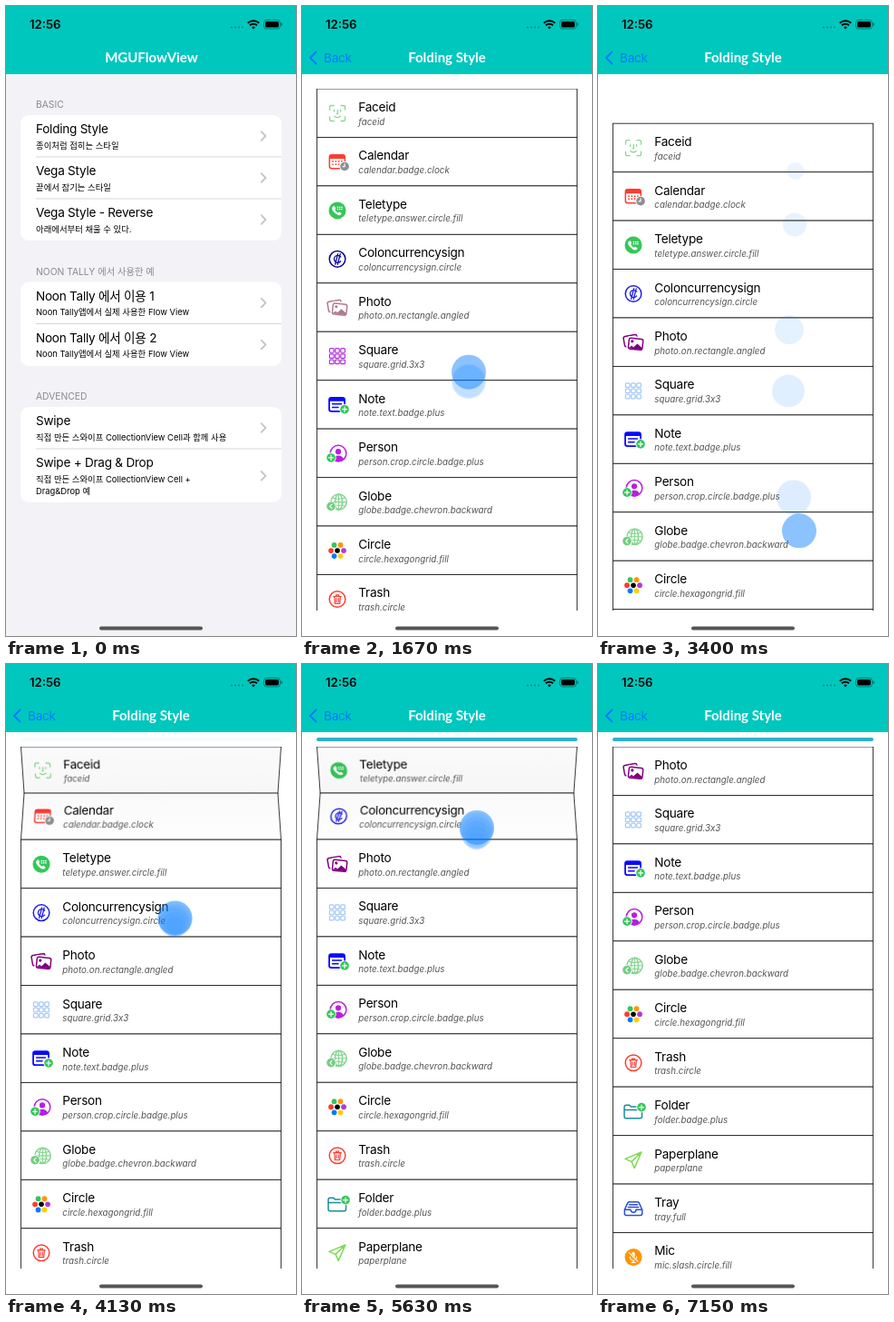
Recreate the animation shown at these times as an HTML page. Size 320 px wide and 693 px high, loop 7190 ms.

```html
<!DOCTYPE html>
<html lang="ko">
<head>
<meta charset="utf-8">
<title>Folding list</title>
<style>
html, body { margin: 0; width: 100%; height: 100%; overflow: hidden; background: #fff; }
#stage { position: relative; width: 320px; height: 693px; overflow: hidden; background: #f2f2f7; }
#stage > svg, #page { position: absolute; left: 0; top: 0; width: 320px; height: 693px; }
svg { display: block; overflow: visible; }
text { font-family: Inter, "Noto Sans CJK KR", "Noto Sans CJK", sans-serif; }
.title { font-size: 13.6px; letter-spacing: -.26px; }
.sub { font-size: 9.4px; }
.head { font-size: 10.3px; fill: #8a8a8e; }
.nav { font: 700 15px Lato, sans-serif; fill: #fff; text-anchor: middle; }
.name { font-size: 9.8px; font-style: italic; fill: #555; }
#page { background: #fff; }
#bar { position: absolute; left: 16px; top: 81px; width: 288px; height: 4px; border-radius: 2px; background: #30b0c7; }
#list { position: absolute; left: 15px; top: 90.5px; width: 290px; height: 574.5px; overflow: hidden; }
.row { position: absolute; left: 1px; top: .5px; width: 288px; height: 53.45px; background: #fff; }
.row svg, .shade { position: absolute; left: 0; top: 0; width: 288px; height: 53.45px; }
</style>
</head>
<body>
<div id="stage">
  <svg id="menu" viewBox="0 0 320 693"></svg>
  <div id="page"><div id="bar"></div><div id="list"></div></div>
  <svg viewBox="0 0 320 693">
    <rect width="320" height="75" fill="#00c7be"/>
    <text x="26" y="25.3" font-size="13.2" font-weight="600">12:56</text>
    <path d="M249 23.5h13" stroke="#000" stroke-opacity=".3" stroke-width="2" stroke-linecap="round" stroke-dasharray="0 4"/>
    <g fill="none" stroke="#000" stroke-width="1.9">
      <path d="M266.8 18.7a9 9 0 0 1 12.4 0M269 21.3a5.8 5.8 0 0 1 8 0"/>
      <path d="M273 25.4l-1.9-2a2.8 2.8 0 0 1 3.8 0z" fill="#000" stroke="none"/>
      <rect x="284.5" y="15.4" width="18" height="9.6" rx="3" stroke-width=".9" stroke-opacity=".45"/>
      <rect x="286" y="16.9" width="15" height="6.6" rx="1.8" fill="#000" stroke="none"/>
      <path d="M304.2 18.8v3" stroke-width="1.1" stroke-opacity=".5"/>
    </g>
    <text id="menuTitle" class="nav" x="160.5" y="62">MGUFlowView</text>
    <text id="pageTitle" class="nav" x="160" y="62">Folding Style</text>
    <g id="back">
      <path d="M15.5 50.5L9 57l6.5 6.5" fill="none" stroke="#007aff" stroke-width="2" stroke-linecap="round" stroke-linejoin="round"/>
      <text class="title" x="24" y="62" fill="#007aff">Back</text>
    </g>
    <rect x="103" y="682.5" width="114" height="4" rx="2" fill="#555"/>
    <g id="touches" fill="#007aff"></g>
  </svg>
</div>
<script>
const LOOP = 7190, ROW = 53.45, PAIR = ROW * 2, DEPTH = 420, RECOLOR = 3200;
const $ = id => document.getElementById(id);
const clamp = (v, a = 0, b = 1) => Math.min(b, Math.max(a, v));

// Menu screen
const card = (top, bottom, lines) =>
  `<rect x="16" y="${top}" width="288" height="${bottom - top}" rx="9" fill="#fff"/>` +
  lines.map(y => `<path d="M33 ${y}H304" stroke="#c6c6c8" stroke-width=".7"/>`).join('');
const label = (cls, y, s) => `<text class="${cls}" x="33" y="${y}">${s}</text>`;
const item = (y, title, ...subs) => label('title', y, title) +
  subs.map((s, i) => label('sub', y + 16.8 + i * 13, s)).join('') +
  `<path d="M281.7 ${y + 3 + (subs.length - 1) * 6.5 - 4.8}l4.8 4.8-4.8 4.8" fill="none" stroke="#c4c4c6" stroke-width="1.8" stroke-linecap="round" stroke-linejoin="round"/>`;

$('menu').innerHTML = '<rect width="320" height="693" fill="#f2f2f7"/>' +
  label('head', 112, 'BASIC') + card(120, 258, []) +
  '<path id="pressed" d="M16 166V129a9 9 0 0 1 9-9H295a9 9 0 0 1 9 9V166z" fill="#d1d1d6"/>' +
  '<path d="M33 166H304M33 212H304" stroke="#c6c6c8" stroke-width=".7"/>' +
  item(140, 'Folding Style', '종이처럼 접히는 스타일') +
  item(186, 'Vega Style', '끝에서 잠기는 스타일') +
  item(232, 'Vega Style - Reverse', '아래에서부터 채울 수 있다.') +
  label('head', 295.5, 'NOON TALLY 에서 사용한 예') + card(303.5, 396, [349.5]) +
  item(323.5, 'Noon Tally 에서 이용 1', 'Noon Tally앱에서 실제 사용한 Flow View') +
  item(369.5, 'Noon Tally 에서 이용 2', 'Noon Tally앱에서 실제 사용한 Flow View') +
  label('head', 433, 'ADVENCED') + card(441, 546, [487]) +
  item(461, 'Swipe', '직접 만든 스와이프 CollectionView Cell과 함께 사용') +
  item(507.3, 'Swipe + Drag &amp; Drop', '직접 만든 스와이프 CollectionView Cell +', 'Drag&amp;Drop 예') +
  '<rect id="dim" width="320" height="693"/>';

// Icons, drawn around their own centre
const SOLID = 'fill="currentColor" stroke="none"';
const path = (d, attrs = '') => `<path d="${d}" ${attrs}/>`;
const dot = (x, y, r, attrs = SOLID) => `<circle cx="${x}" cy="${y}" r="${r}" ${attrs}/>`;
const box = (x, y, w, h, r, attrs = '') => `<rect x="${x}" y="${y}" width="${w}" height="${h}" rx="${r}" ${attrs}/>`;
const badge = (x, y, mark, fill = '#34c759') => dot(x, y, 5.7, 'fill="#fff" stroke="none"') +
  dot(x, y, 4.8, `fill="${fill}" stroke="none"`) +
  `<path transform="translate(${x} ${y})" d="${mark}" stroke="#fff" stroke-width="1.2"/>`;
const PLUS = 'M-2.5 0h5M0-2.5v5';
const grid = (xs, ys, draw) => ys.map(y => xs.map(x => draw(x, y)).join('')).join('');
const WHITE = 'stroke="#fff" stroke-width="1.2"';

const icons = {
  faceid: path('M-8.5-4v-2.5a2 2 0 0 1 2-2H-4M4-8.5h2.5a2 2 0 0 1 2 2V-4M8.5 4v2.5a2 2 0 0 1-2 2H4M-4 8.5h-2.5a2 2 0 0 1-2-2V4M-3.5-3.5v1.6M3.5-3.5v1.6M.3-3.5v4h-1M-3.2 3.2q3.2 2.8 6.4 0', 'stroke-width="1.3"'),
  calendar: box(-8.7, -7.8, 17, 15, 2.5) + path('M-8.7-3.5v-2a2.3 2.3 0 0 1 2.3-2.3H6a2.3 2.3 0 0 1 2.3 2.3v2z', SOLID) +
    grid([-5, -1.7, 1.6, 4.9], [-.5, 2.6], (x, y) => dot(x, y, .9)) + badge(8, 5, 'M0-2.8V.2H-2', '#8e8e93'),
  teletype: dot(0, 0, 9.5) + path('M-5.5-3.6q-1.5 2 2 5.8t6.6 3q1.7-.8 1.4-2L2.2 1.6.8 2.6Q-1.8 1.2-2.8-1.2L-1.7-2.5-3.3-4.9q-1.2-.2-2.2 1.3z', 'fill="#fff" stroke="none"') +
    grid([.3, 2.6, 4.9], [-3.6, -1.4], (x, y) => dot(x, y, .85, 'fill="#fff" stroke="none"')),
  colon: dot(0, 0, 8.8) + path('M3.6-2.4a4 4 0 1 0 0 4.8M.6-5.8l-3 11.6M3.2-5.6L.2 6', 'stroke-width="1.3"'),
  photo: `<g transform="rotate(-10)">${box(-10, -8, 15, 11.5, 2)}</g><g transform="rotate(6)">` +
    box(-5.7, -5.2, 17, 13.2, 2.4, 'fill="#fff" stroke="#fff" stroke-width="3"') + box(-5, -4.5, 15.5, 12, 2) +
    dot(-1.3, -.9, 1.6) + path('M-4.6 6.8l3.2-3 2 1.6L4.5 1l5.6 4v2.2z', SOLID) + '</g>',
  square: grid([-8.6, -2.4, 3.8], [-8.6, -2.4, 3.8], (x, y) => box(x, y, 4.6, 4.6, 1, 'stroke-width="1.2"')),
  note: box(-9, -7.8, 17, 15, 2.3, 'stroke-width="1.8"') + path('M-9-4v-1.6a2.2 2.2 0 0 1 2.2-2.2H5.8A2.2 2.2 0 0 1 8-5.6V-4z', SOLID) +
    path('M-5.5-1H4.5M-5.5 2.8H1') + badge(8, 5, PLUS),
  person: dot(1, 0, 8.8, '') + dot(1, -2, 3.1) + path('M-5 6.2Q-3.5 2.3 1 2.3T7 6.2Q4.5 8.8 1 8.8T-5 6.2z', SOLID) + badge(-7, 4.8, PLUS),
  globe: dot(1.5, 0, 8.6, '') + `<ellipse cx="1.5" rx="4" ry="8.6"/>` +
    path('M1.5-8.6V8.6M-7 0H10M-5.2-4.6q6.7 2.4 13.4 0M-5.2 4.6q6.7-2.4 13.4 0', 'stroke-width="1.1"') + badge(-7, 4.8, 'M1-2.3L-1.3 0 1 2.3', '#72cd82'),
  circle: dot(0, 0, 2.8, 'fill="#000" stroke="none"') + ['#af3bd6', '#ffcc00', '#007aff', '#ff3b30', '#34c759', '#ff9500'].map((c, i) =>
    dot(7 * Math.cos(i * Math.PI / 3), 7 * Math.sin(i * Math.PI / 3), 2.9, `fill="${c}" stroke="none"`)).join(''),
  trash: dot(0, 0, 8.8) .replace(SOLID, '') + path('M-4.3-3h8.6M-1.5-3.2v-1.4h3v1.4M-3.3-2.6l.6 7.4h5.4l.6-7.4M-1.2-.8v3.8M1.2-.8v3.8', 'stroke-width="1.2"'),
  folder: path('M-10 5.5V-5a2 2 0 0 1 2-2h3.4l2 1.8H7.5a2 2 0 0 1 2 2V5.5a2 2 0 0 1-2 2H-8a2 2 0 0 1-2-2zM-10-1.6H9.5') + badge(9, -4.5, PLUS),
  plane: path('M8.8-8.6L-9-1.2l7 3 3.2 7zM8.8-8.6L-2 1.8'),
  tray: path('M-9.7 1.2l3.4-7.4a2 2 0 0 1 1.7-1H4.6a2 2 0 0 1 1.7 1L9.7 1.2V5.4a2 2 0 0 1-2 2H-7.7a2 2 0 0 1-2-2zM-9.7 1.2H-3a3 3 0 0 0 6 0H9.7M-4.5-4.2h9M-5.7-1.5H5.7'),
  mic: dot(0, 0, 9.5) + box(-1.7, -5.8, 3.4, 7.6, 1.7, 'fill="#fff" stroke="none"') +
    path('M-3.7-.5a3.7 4 0 0 0 7.4 0M0 3.6v2.2M-2 5.8h4', WHITE) + path('M-5-5.2L5 5.2', 'stroke="#ff9500" stroke-width="2.6"') + path('M-4.7-5.2L4.9 4.6', WHITE),
  sun: path('M-5 3.2a5 5 0 0 1 10 0z', SOLID) + path('M-9.5 3.2h2M7.5 3.2h2M-6.6-3.4l1.3 1.3M6.6-3.4L5.3-2.1M0-6.2v1.8M-5.5 5.8h2M-1 5.8h2M3.5 5.8h2')
};
icons.colon = icons.colon.replace(SOLID, '');

// title, symbol name, icon, first colour, colour after reloading
const rows = [
  ['Faceid', 'faceid', 'faceid', '#86d993'],
  ['Calendar', 'calendar.badge.clock', 'calendar', '#ff3b30'],
  ['Teletype', 'teletype.answer.circle.fill', 'teletype', '#34c759'],
  ['Coloncurrencysign', 'coloncurrencysign.circle', 'colon', '#0a0a96', '#1e1ee6'],
  ['Photo', 'photo.on.rectangle.angled', 'photo', '#b07a8e', '#800080'],
  ['Square', 'square.grid.3x3', 'square', '#b62fe0', '#a4c8f4'],
  ['Note', 'note.text.badge.plus', 'note', '#0a0aff'],
  ['Person', 'person.crop.circle.badge.plus', 'person', '#b81fe0'],
  ['Globe', 'globe.badge.chevron.backward', 'globe', '#86d48f'],
  ['Circle', 'circle.hexagongrid.fill', 'circle', '#000'],
  ['Trash', 'trash.circle', 'trash', '#ff3b30'],
  ['Folder', 'folder.badge.plus', 'folder', '#5fdcae', '#1c8a9c'],
  ['Paperplane', 'paperplane', 'plane', '#8b4a3c', '#7ed957'],
  ['Tray', 'tray.full', 'tray', '#4a12a8', '#2a50d0'],
  ['Mic', 'mic.slash.circle.fill', 'mic', '#ff9500'],
  ['Sun', 'sun.dust.fill', 'sun', '#ffc629']
].map(([title, name, icon, first, later = first], i) => {
  const el = document.createElement('div');
  el.className = 'row';
  el.style.transformOrigin = i % 2 ? '50% 100%' : '50% 0';
  el.innerHTML = `<svg viewBox="0 0 288 53.45">
    <rect x=".4" width="287.2" height="53.45" fill="none" stroke="#222" stroke-width=".9"/>
    <g transform="translate(23 27)" fill="none" stroke="currentColor" stroke-width="1.5" stroke-linecap="round" stroke-linejoin="round">${icons[icon]}</g>
    <text class="title" x="46.3" y="25">${title}</text>
    <text class="name" x="46.3" y="39.6">${name}</text></svg><div class="shade"></div>`;
  $('list').append(el);
  return { el, art: el.querySelector('g'), shade: el.lastChild, first, later };
});

// Smooth curve through [time, value] points, without overshoot
function track(keys, t) {
  const last = keys.length - 1;
  if (t <= keys[0][0]) return keys[0][1];
  if (t >= keys[last][0]) return keys[last][1];
  const slope = i => (keys[i + 1][1] - keys[i][1]) / (keys[i + 1][0] - keys[i][0]);
  const tangent = i => {
    if (i === 0 || i === last) return 0;
    const a = slope(i - 1), b = slope(i);
    return a * b > 0 ? 2 * a * b / (a + b) : 0;
  };
  const i = keys.findIndex(k => k[0] > t) - 1;
  const [t0, v0] = keys[i], [t1, v1] = keys[i + 1], d = t1 - t0, u = (t - t0) / d;
  return v0 + (v1 - v0) * u * u * (3 - 2 * u) + d * u * (1 - u) * (tangent(i) * (1 - u) - tangent(i + 1) * u);
}

const scroll = [[1670, 0], [2140, 190], [2600, 368], [2670, 382], [2950, 4 * PAIR], [3170, 4 * PAIR],
  [3235, 320], [3268, 260], [3301, 146], [3335, 77], [3368, -21], [3400, -38], [3425, -41], [3530, 0],
  [3890, 0], [4730, 38], [5630, 111.7], [6600, 192], [7130, 2 * PAIR]];

const touches = [
  { from: 850, to: 930, x: [[0, 180]], y: [[0, 143]] },
  { from: 1590, to: 2590, x: [[1670, 184], [2590, 209]], y: [[1637, 413], [1670, 403], [2140, 213], [2590, 38]] },
  { from: 3120, to: 3425, x: [[3235, 218], [3268, 217], [3301, 211], [3335, 210], [3368, 216], [3400, 222]],
    y: [[3140, 74], [3170, 80], [3235, 182], [3268, 241], [3301, 356], [3335, 425], [3368, 541], [3400, 577], [3425, 582]] },
  { from: 3790, to: 6600, x: [[3800, 186], [4730, 189], [5630, 193], [6600, 196]],
    y: [[3800, 302], [3890, 292], [4730, 254], [5630, 180], [6600, 100]] }
];

function drawTouch({ from, to, x, y }, t) {
  if (t < from || t > to + 220) return '';
  const spot = (at, r, alpha) => `<circle cx="${track(x, at)}" cy="${track(y, at)}" r="${r}" fill-opacity="${alpha}"/>`;
  let out = '';
  for (let k = 5; k > 0; k--) {
    const at = t - 33.3 * k;
    if (at >= from && at <= to) out += spot(at, 19.5 - .4 * k * k, .15 - .015 * k);
  }
  const gone = clamp((t - to) / 160), shown = clamp((t - from) / 50);
  return out + spot(Math.min(t, to), 19 + 14 * gone, .45 * shown * (1 - gone));
}

// Angle at which a row, seen in perspective, covers the given share of its height
function foldAngle(share) {
  let angle = Math.acos(share);
  for (let i = 0; i < 12; i++) angle = Math.acos(clamp(share * (1 + ROW * Math.sin(angle) / DEPTH)));
  return angle;
}

function placeRow({ el, art, shade, first, later }, i, offset, t) {
  const odd = i % 2, top = (i - odd) / 2 * PAIR - offset;
  const visible = top > -PAIR && top + odd * ROW < 576;
  el.style.display = visible ? '' : 'none';
  if (!visible) return;
  art.style.color = t < RECOLOR ? first : later;
  const height = PAIR + Math.min(0, top), fold = 1 - height / PAIR;
  if (offset <= 0 || fold < .0005) {
    el.style.transform = `translateY(${top + odd * ROW}px)`;
    shade.style.background = 'none';
    return;
  }
  const angle = foldAngle(height / PAIR) * (odd ? 1 : -1);
  el.style.transform = `translateY(${odd ? height - ROW : 0}px) perspective(${DEPTH}px) rotateX(${angle}rad)`;
  const [a, b] = odd ? [.5, .05] : [.42, .75];
  shade.style.background = `linear-gradient(rgba(0,0,0,${a * fold}), rgba(0,0,0,${b * fold}))`;
}

function draw(t) {
  const push = 1 - (1 - clamp((t - 960) / 540)) ** 4;
  $('menu').style.display = push < 1 ? '' : 'none';
  $('menu').style.transform = `translateX(${-96 * push}px)`;
  $('dim').setAttribute('opacity', .1 * push);
  $('pressed').setAttribute('opacity', t > 910 ? 1 : 0);
  $('page').style.display = push > 0 ? '' : 'none';
  $('page').style.transform = push < 1 ? `translateX(${320 * (1 - push)}px)` : 'none';
  $('menuTitle').setAttribute('transform', `translate(${-110 * push})`);
  $('menuTitle').setAttribute('opacity', clamp(1 - 1.4 * push));
  $('pageTitle').setAttribute('transform', `translate(${130 * (1 - push)})`);
  $('pageTitle').setAttribute('opacity', push);
  $('back').setAttribute('opacity', push);

  const offset = track(scroll, t);
  $('bar').style.opacity = clamp(offset / PAIR);
  rows.forEach((row, i) => placeRow(row, i, offset, t));
  $('touches').innerHTML = touches.map(touch => drawTouch(touch, t)).join('');
}

function tick() {
  draw(performance.now() % LOOP);
  requestAnimationFrame(tick);
}
tick();
</script>
</body>
</html>
```
